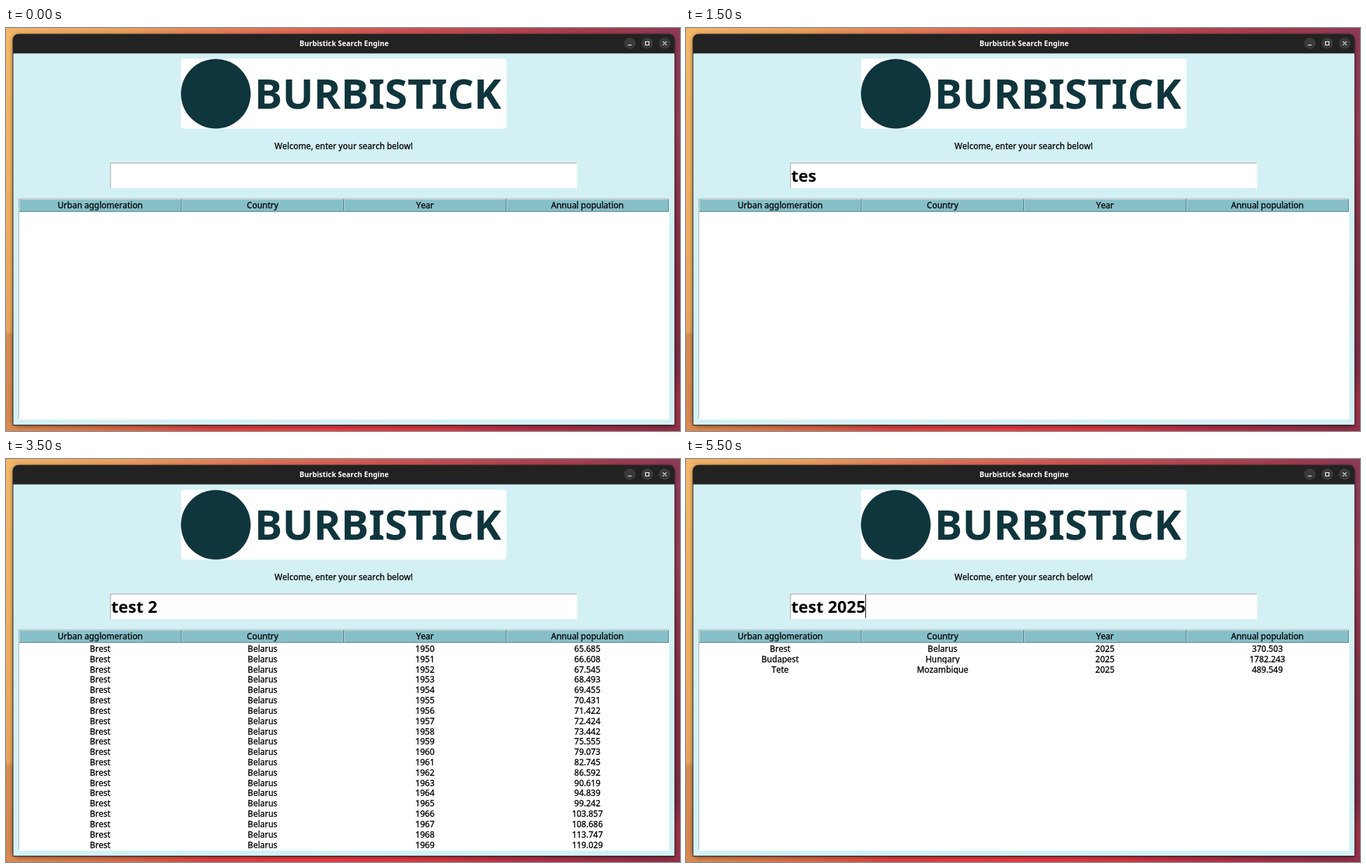
Write an HTML page that moves like this. It is 967 px wide and 579 px high and loops after 6500 ms.

```html
<!DOCTYPE html>
<html lang="en">
<head>
<meta charset="utf-8">
<title>Burbistick Search Engine</title>
<style>
  html, body { margin: 0; width: 100%; height: 100%; overflow: hidden; }
  svg { display: block; font-family: "Noto Sans", sans-serif; font-kerning: none; }
  .ui { font-size: 12px; text-anchor: middle; stroke: #000; stroke-width: .3; }
  .big { font-size: 23.7px; font-weight: 700; white-space: pre; }
  .title { font-size: 10.35px; font-weight: 700; text-anchor: middle; fill: #fff; }
  .brand { font-size: 59.3px; font-weight: 700; fill: #0f353d; }
  .bar { fill: #222; }
  .idle .bar { fill: #2c2c2c; }
  .idle .title { fill: #929292; }
  .idle .knob { fill: none; }
  .idle .icon { stroke: #a0a0a0; }
  .idle .shadow { opacity: .6; }
  .knob { fill: #3a3a3a; }
  .icon { fill: none; stroke: #fff; stroke-width: 1.1; }
</style>
</head>
<body>
<svg id="stage" width="967" height="579" viewBox="0 0 967 579">
  <defs>
    <linearGradient id="top">
      <stop offset="0" stop-color="#f2b468"/><stop offset=".17" stop-color="#eaa05f"/>
      <stop offset=".3" stop-color="#e4835a"/><stop offset=".44" stop-color="#de6956"/>
      <stop offset=".57" stop-color="#cf5555"/><stop offset=".72" stop-color="#b84852"/>
      <stop offset=".88" stop-color="#a23c50"/><stop offset="1" stop-color="#8d3a58"/>
    </linearGradient>
    <linearGradient id="bottom">
      <stop offset="0" stop-color="#d98b50"/><stop offset=".1" stop-color="#dd7a4c"/>
      <stop offset=".22" stop-color="#dc5f45"/><stop offset=".3" stop-color="#e04341"/>
      <stop offset=".48" stop-color="#ea3c45"/><stop offset=".64" stop-color="#d83844"/>
      <stop offset=".76" stop-color="#b8314a"/><stop offset="1" stop-color="#8f2f48"/>
    </linearGradient>
    <linearGradient id="left" x2="0" y2="1">
      <stop offset="0" stop-color="#f4b868"/><stop offset=".5" stop-color="#f0ae60"/>
      <stop offset=".76" stop-color="#e9a45c"/><stop offset=".77" stop-color="#d98d52"/>
      <stop offset="1" stop-color="#d6884f"/>
    </linearGradient>
    <linearGradient id="right" x2="0" y2="1">
      <stop offset="0" stop-color="#8b3a58"/><stop offset=".26" stop-color="#953a50"/>
      <stop offset=".52" stop-color="#823044"/><stop offset=".86" stop-color="#7d2a42"/>
      <stop offset=".94" stop-color="#a03048"/><stop offset="1" stop-color="#94304a"/>
    </linearGradient>
    <filter id="blur" x="-5%" y="-5%" width="110%" height="110%"><feGaussianBlur stdDeviation="3"/></filter>
  </defs>

  <rect width="967" height="290" fill="url(#top)"/>
  <rect y="290" width="967" height="289" fill="url(#bottom)"/>
  <rect y="8" width="12" height="563" fill="url(#left)"/>
  <rect x="957" y="8" width="10" height="563" fill="url(#right)"/>

  <rect class="shadow" x="10" y="10" width="949" height="562" rx="8" fill="#000" fill-opacity=".5" filter="url(#blur)"/>
  <path class="bar" d="M9.5 571V18q0-9.5 9.5-9.5H950q9.5 0 9.5 9.5V571z"/>
  <rect x="10.5" y="36.5" width="948.5" height="533.5" fill="#d3f1f5"/>
  <text class="title" x="485" y="25.7">Burbistick Search Engine</text>
  <g class="knob">
    <circle cx="895" cy="22" r="8.3"/><circle cx="920" cy="22" r="8.3"/><circle cx="945" cy="22" r="8.3"/>
  </g>
  <path class="icon" d="M892.3 24.5h5.4M917.5 19.5h5v5h-5zM942.4 19.4l5.2 5.2m0-5.2l-5.2 5.2"/>

  <rect x="251" y="44" width="467" height="100.5" rx="4" fill="#fff"/>
  <circle cx="301" cy="94.5" r="50" fill="#0f353d"/>
  <text class="brand" x="356.6" y="116.3">BURBISTICK</text>
  <text class="ui" x="484.5" y="174">Welcome, enter your search below!</text>

  <rect x="149.5" y="193.5" width="670" height="36.5" fill="#fff"/>
  <path d="M150 230V194H819" fill="none" stroke="#9c9c9c"/>
  <text class="big" id="query" x="151" y="221"/>
  <path id="caret" d="M0 195V228.5" stroke="#000"/>

  <rect x="18" y="245" width="933.5" height="317.5" fill="#fff"/>
  <path d="M18.4 562V245.3H951" fill="none" stroke="#a2a9aa" stroke-width=".9"/>
  <g id="head"></g>
  <g id="history"></g>
  <g id="results"></g>

  <g id="drop">
    <rect x="150" y="231" width="669" height="172" fill="#fff" stroke="#cfcfcf"/>
    <path d="M150.3 403V231H819" fill="none" stroke="#9c9c9c"/>
    <g id="hints" class="big" fill="#808080"></g>
  </g>
</svg>
<script>
const $ = id => document.getElementById(id);
const COL = 233, ROW = 14.82, LOOP = 6500;
const center = i => 18.6 + COL * (i + .5);

const cells = (row, y) => row.map((s, i) =>
  `<text class="ui" x="${center(i)}" y="${y}">${s}</text>`).join('');

// Each row is a nested viewport, so low descenders are cut at its edge.
const table = rows => rows.map((row, i) =>
  `<svg y="${264.2 + ROW * i}" width="967" height="${ROW}">${cells(row, 12.8)}</svg>`).join('');

$('head').innerHTML = [0, 1, 2, 3].map(i => {
  const x = 19 + COL * i;
  return `<rect x="${x}" y="246" width="${COL}" height="18" fill="#87bfc9"/>
    <path d="M${x + .5} 264V246.4H${x + COL}" fill="none" stroke="#c6e3e8" stroke-width=".8"/>
    <path d="M${x} 263.7H${x + COL - .5}V246" fill="none" stroke="#527880" stroke-width=".9"/>`;
}).join('') + cells(['Urban agglomeration', 'Country', 'Year', 'Annual population'], 259.2);

const brest = ('65.685 66.608 67.545 68.493 69.455 70.431 71.422 72.424 73.442 75.555 ' +
  '79.073 82.745 86.592 90.619 94.839 99.242 103.857 108.686 113.747 119.029').split(' ');
$('history').innerHTML = table(brest.map((n, i) => ['Brest', 'Belarus', 1950 + i, n]));
$('results').innerHTML = table([
  ['Brest', 'Belarus', 2025, '370.503'],
  ['Budapest', 'Hungary', 2025, '1782.243'],
  ['Tete', 'Mozambique', 2025, '489.549'],
]);

const hints = {
  t: ['Toronto', 'Tampico', 'Tashkent', 'Tianshui', 'Taipei'],
  te: ['Teresina', 'Temuco', 'Tengzhou', 'Tegucigalpa', 'Tehran'],
};

// start, typed text, table, caret, window out of focus
const steps = [
  [0, ''],
  [500, 't'],
  [1000, 'te'],
  [1500, 'tes'],
  [2000, 'test', '', true],
  [2500, 'test', 'history'],
  [3500, 'test 2', 'history'],
  [4000, 'test 20', 'history', true],
  [4500, 'test 202', 'history', false, true],
  [5000, 'test 2025', 'history', false, true],
  [5500, 'test 2025', 'results', true],
];

const show = (id, on) => $(id).style.display = on ? '' : 'none';
let current;

function render([, text, rows, caret, idle]) {
  const query = $('query'), list = hints[text];
  query.textContent = text;
  show('history', rows === 'history');
  show('results', rows === 'results');
  show('caret', caret);
  if (caret) $('caret').setAttribute('transform', `translate(${151 + query.getComputedTextLength()})`);
  show('drop', list);
  if (list) $('hints').innerHTML = list.map((s, i) =>
    `<text x="151" y="${257.2 + 34.1 * i}">${s}</text>`).join('');
  $('stage').classList.toggle('idle', !!idle);
}

const start = performance.now();
function tick() {
  const t = (performance.now() - start) % LOOP;
  const step = steps.findLast(s => s[0] <= t);
  if (step !== current) render(current = step);
  requestAnimationFrame(tick);
}
tick();
</script>
</body>
</html>
```
